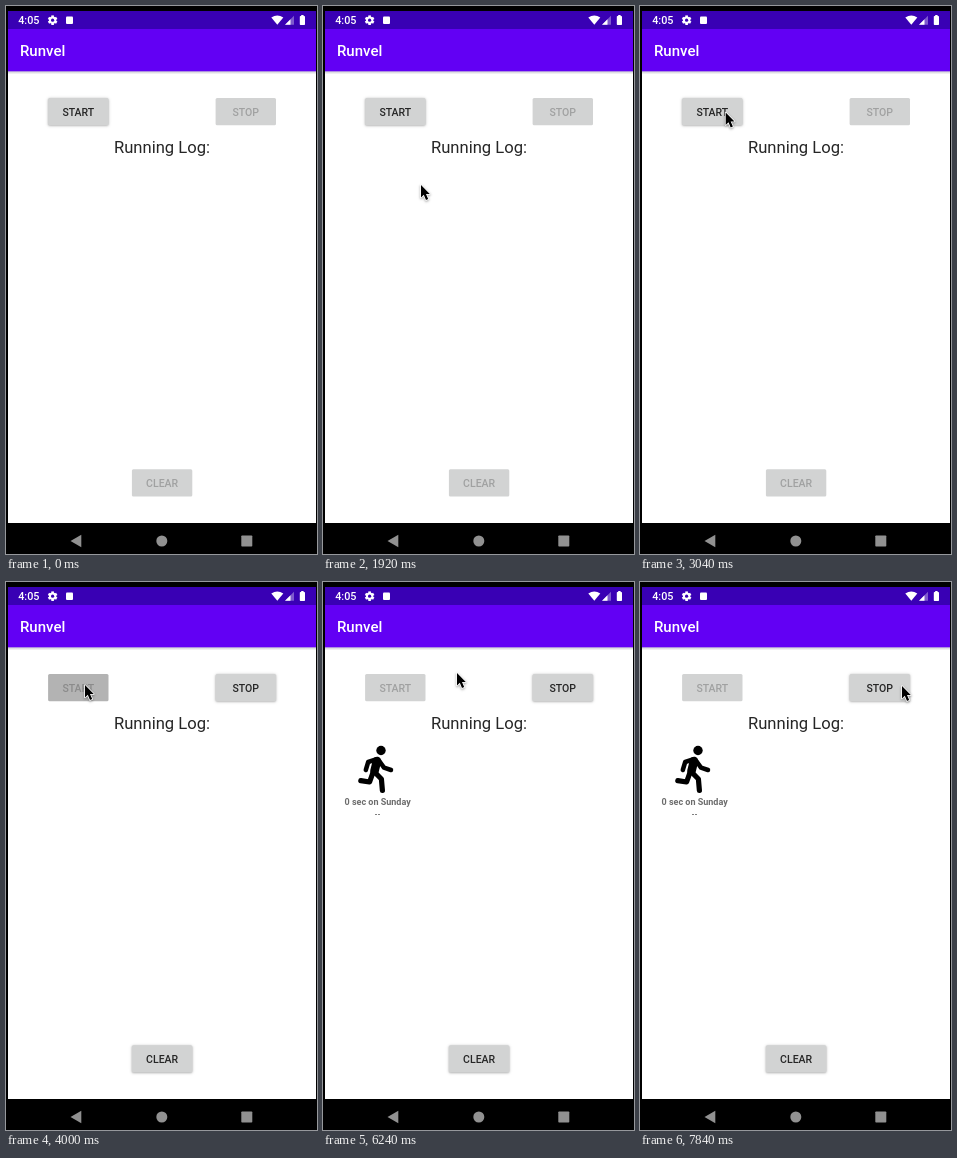
Write an HTML page with a canvas that moves like this. It is 311x548 px and loops after 8000 ms.

```html
<!DOCTYPE html>
<html lang="en">
<head>
<meta charset="utf-8">
<title>Run timer</title>
<style>
html, body { margin: 0; width: 100%; height: 100%; overflow: hidden; background: #000; }
canvas { display: block; width: 311px; height: 548px; }
</style>
</head>
<body>
<canvas id="stage"></canvas>
<script>
const W = 311, H = 548, LOOP = 8000, STEP = 160;
const LEFT = 2, WIDE = 308;
const ENTER = 640, PRESS = 3840, LOGGED = 4160;
const canvas = document.getElementById('stage');
const ctx = canvas.getContext('2d');
const dpr = window.devicePixelRatio || 1;
canvas.width = Math.round(W * dpr);
canvas.height = Math.round(H * dpr);

// The pointer eases to each goal and rests there until the next move
const entry = { x: 264, y: 448 };
const moves = [
  { start: ENTER, end: 1120, x: 196, y: 348 },
  { start: 1280, end: 1920, x: 98, y: 179 },
  { start: 1920, end: 2400, x: 96, y: 112 },
  { start: 2400, end: 3520, x: 79, y: 103 },
  { start: 4000, end: 4640, x: 134, y: 91 },
  { start: 7040, end: 7840, x: 262, y: 104 }
];

function progress(t, start, end) {
  const k = Math.min(1, Math.max(0, (t - start) / (end - start)));
  return k * k * (3 - 2 * k);
}

function pointerAt(t) {
  let { x, y } = entry;
  for (const m of moves) {
    const k = progress(t, m.start, m.end);
    x += (m.x - x) * k;
    y += (m.y - y) * k;
  }
  return [x, y];
}

function rect(x, y, w, h, color) {
  ctx.fillStyle = color;
  ctx.fillRect(x, y, w, h);
}

function trace(points) {
  ctx.beginPath();
  points.forEach(([x, y]) => ctx.lineTo(x, y));
}

function shape(points, color) {
  trace(points);
  ctx.fillStyle = color;
  ctx.fill();
}

function dot(x, y, r, color) {
  ctx.beginPath();
  ctx.arc(x, y, r, 0, Math.PI * 2);
  ctx.fillStyle = color;
  ctx.fill();
}

function rounded(x, y, w, h, r, color) {
  ctx.beginPath();
  ctx.roundRect(x, y, w, h, r);
  ctx.fillStyle = color;
  ctx.fill();
}

function label(str, x, y, size, weight, color, align = 'left') {
  ctx.font = `${weight} ${size}px Roboto, sans-serif`;
  ctx.textAlign = align;
  ctx.fillStyle = color;
  ctx.fillText(str, x, y);
}

function softShadow(alpha, drop) {
  ctx.shadowColor = `rgba(0,0,0,${alpha})`;
  ctx.shadowBlur = 2.5 * dpr;
  ctx.shadowOffsetY = drop * dpr;
}

function button(str, cx, y, enabled, pressed = false) {
  ctx.save();
  if (enabled) softShadow(0.35, 0.5);
  rounded(cx - 30.2, y, 60.4, 27.2, 1.5, pressed ? '#b3b3b3' : '#d2d3d3');
  ctx.restore();
  const ink = enabled ? '#262626' : pressed ? '#8b8b8b' : '#a0a1a1';
  label(str, cx, y + 17.8, 10.5, 500, ink, 'center');
}

function gear(x, y) {
  ctx.save();
  ctx.translate(x, y);
  for (let i = 0; i < 6; i++) {
    rect(-1.3, -4.8, 2.6, 3, '#fff');
    ctx.rotate(Math.PI / 3);
  }
  ctx.restore();
  dot(x, y, 3.6, '#fff');
  dot(x, y, 1.6, '#3900b4');
}

function signal(right, bottom, size, color) {
  shape([[right - size, bottom], [right, bottom], [right, bottom - size]], color);
}

function statusBar() {
  rect(LEFT, 5, WIDE, 18, '#3900b4');
  label('4:05', 12.2, 18.4, 10.8, 500, '#fff');
  gear(46.6, 14.2);
  rounded(60, 10.5, 7, 7.5, 1, '#fff');

  ctx.beginPath();
  ctx.moveTo(271.3, 18.8);
  ctx.lineTo(265.3, 11.6);
  ctx.quadraticCurveTo(271.3, 7.4, 277.3, 11.6);
  ctx.fillStyle = '#fff';
  ctx.fill();

  signal(288, 18.7, 9, 'rgba(255,255,255,.35)');
  signal(284.5, 18.7, 5.5, '#fff');
  rect(295.2, 9, 2.4, 1.5, '#fff');
  rounded(293.8, 10, 5.2, 9, 0.7, '#fff');
}

function appBar() {
  const shade = ctx.createLinearGradient(0, 65, 0, 68.5);
  shade.addColorStop(0, '#c6c6ce');
  shade.addColorStop(1, '#fff');
  rect(LEFT, 65, WIDE, 3.5, shade);
  rect(LEFT, 23, WIDE, 42.3, '#6200f4');
  label('Runvel', 14, 50.2, 15, 500, '#fff');
}

function navBar() {
  const gray = '#919191', y = 535;
  shape([[64.5, y], [75.3, y - 6.2], [75.3, y + 6.2]], gray);
  dot(155.8, y, 5.5, gray);
  rounded(235.3, y - 5.5, 11, 11, 0.8, gray);
}

function limb(width, ...points) {
  trace(points);
  ctx.lineWidth = width;
  ctx.stroke();
}

function runner() {
  ctx.strokeStyle = '#000';
  ctx.lineCap = ctx.lineJoin = 'round';
  dot(58, 168.5, 4.7, '#000');
  limb(8.6, [54, 179], [51.5, 189]);
  limb(4.5, [53, 177.4], [45.2, 180], [42.8, 188]);
  limb(4.5, [57, 180], [61, 185.6], [68, 188]);
  limb(5.2, [52, 190.5], [58.4, 197], [59.4, 208.4]);
  limb(5.2, [49.8, 191], [46.6, 200], [37.8, 198.6]);
  label('0 sec on Sunday', 54.6, 223.2, 9, 700, '#6c6c6c', 'center');
  rect(52, 232, 2, 1, '#808080');
  rect(55, 232, 2, 1, '#808080');
}

function pointer([x, y]) {
  ctx.save();
  ctx.translate(x, y);
  trace([[0, 0], [0, 12.4], [2.8, 9.8], [5, 15], [7.2, 14], [5, 9], [8.8, 9]]);
  ctx.closePath();
  ctx.lineJoin = 'round';
  ctx.lineWidth = 1.6;
  ctx.strokeStyle = '#fff';
  softShadow(0.4, 1);
  ctx.stroke();
  ctx.shadowColor = 'transparent';
  ctx.fillStyle = '#000';
  ctx.fill();
  ctx.restore();
}

function draw(t) {
  const running = t >= PRESS;
  const logged = t >= LOGGED;
  ctx.setTransform(dpr, 0, 0, dpr, 0, 0);
  rect(0, 0, W, H, '#000');
  rect(LEFT, 23, WIDE, 494, '#fff');
  statusBar();
  appBar();
  button('START', 72.3, 92, !running, running && !logged);
  button('STOP', 239.8, 92, running);
  button('CLEAR', 156.1, 463.2, running);
  label('Running Log:', 156, 147.3, 16.6, 400, '#262626', 'center');
  if (logged) runner();
  navBar();
  if (t >= ENTER) pointer(pointerAt(t));
}

function tick() {
  const t = performance.now() % LOOP;
  draw(Math.floor(t / STEP) * STEP);
  requestAnimationFrame(tick);
}
draw(0);
requestAnimationFrame(tick);
</script>
</body>
</html>
```
